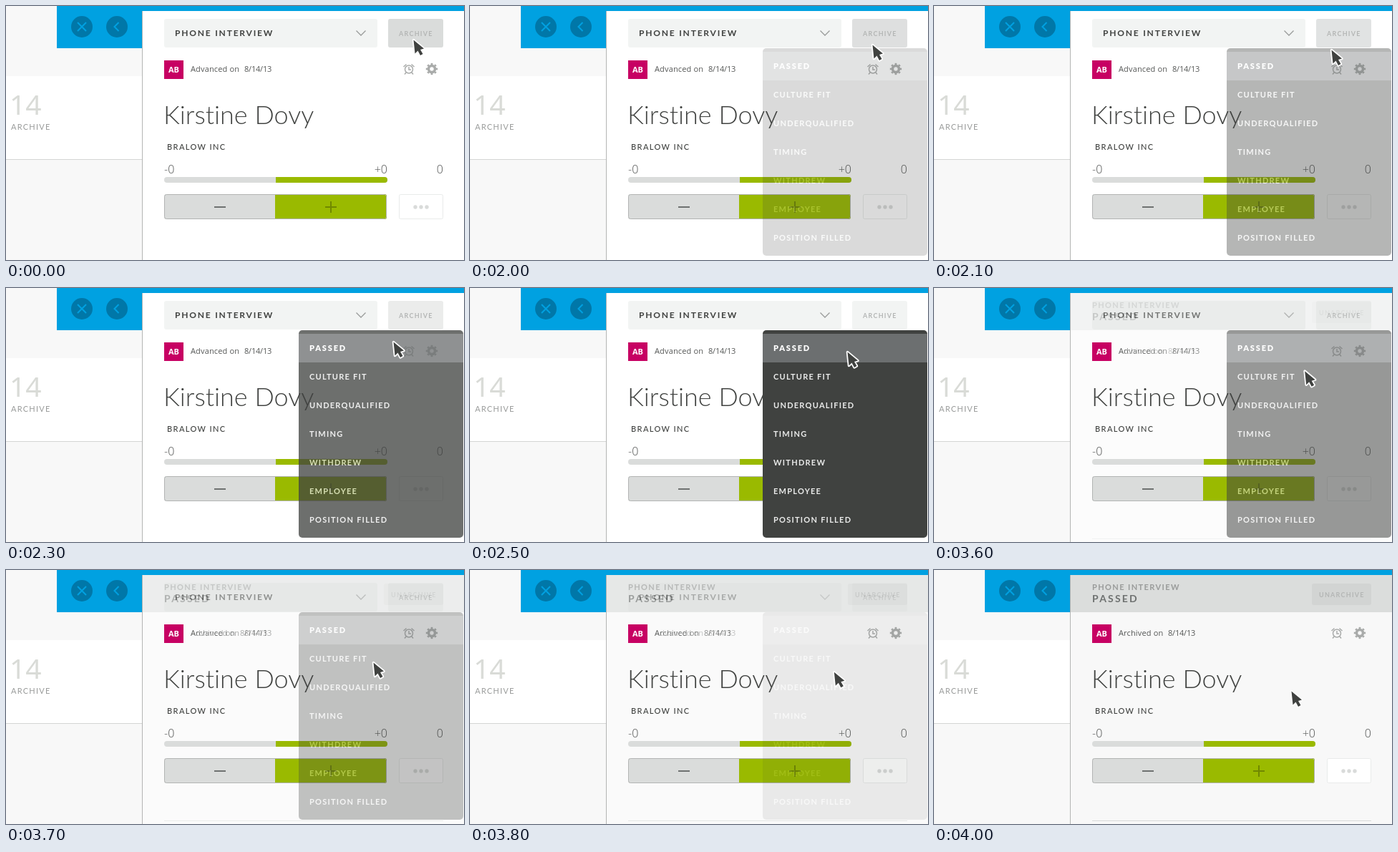
An HTML page that plays this animation: 640x355 px, repeating every 7 s.

```html
<!DOCTYPE html>
<html lang="en">
<head>
<meta charset="utf-8">
<title>Archive a candidate</title>
<style>
  html, body { margin: 0; width: 100%; height: 100%; overflow: hidden; background: #f8f8f8; }
  svg { display: block; width: 640px; height: 355px; }
  text { font: 11px "Open Sans", sans-serif; fill: #555756; white-space: pre; }
  .caps { font: 700 11px Lato, sans-serif; letter-spacing: 1.25px; fill: #404240; }
  .button { font-size: 9px; fill: #b4b6b5; }
  .score { font-size: 16px; font-weight: 300; }
  .name { font: 300 36px Lato, sans-serif; font-variant-ligatures: none; fill: #404240; }
  .line { fill: none; stroke-width: 2; }
  #menu .caps { fill: #eaebea; }
  #menu .active { font-weight: 900; letter-spacing: 1.8px; fill: #fff; }
</style>
</head>
<body>
<svg viewBox="0 0 640 355">
  <!-- page behind the panel -->
  <rect width="640" height="355" fill="#f8f8f8"/>
  <rect y="98" width="191" height="116" fill="#fff"/>
  <rect y="214" width="191" height="1" fill="#d4d5d4"/>
  <text x="5" y="152" style="font:39px 'Noto Sans',sans-serif;fill:#d9dbd7">14</text>
  <text class="caps" x="7" y="173" style="font-weight:400;fill:#999b9a">ARCHIVE</text>
  <path d="M71 0H640V7H191V59H71Z" fill="#00a1e1"/>
  <g fill="#0077a8"><circle cx="106" cy="29" r="15"/><circle cx="155" cy="29" r="15"/></g>
  <path class="line" d="M100 23l12 12m0-12l-12 12M157.500 23l-6 6 6 6" stroke="#00a1e1"/>

  <!-- panel; the archived state fades in over the active one -->
  <rect x="190" y="7" width="1" height="348" fill="#b4b5b4"/>
  <rect x="191" y="7" width="449" height="348" fill="#fff"/>
  <rect x="221" y="18" width="298" height="40" rx="3" fill="#f2f4f3"/>
  <text class="caps" x="236" y="42" style="font-size:12px;letter-spacing:1.8px">PHONE INTERVIEW</text>
  <path class="line" d="M489.500 34.500l6.500 6.500 6.500-6.500" stroke="#999b9a" style="stroke-width:1.300"/>
  <rect x="534" y="18" width="77" height="40" rx="3" fill="#f2f4f3"/>
  <rect id="hover" x="534" y="18" width="77" height="40" rx="3" fill="#dadcdb"/>
  <text class="caps button" x="549" y="42">ARCHIVE</text>
  <text x="258" y="92" letter-spacing=".15">Advanced on</text>
  <text x="333" y="92" letter-spacing="-.2">8/14/13</text>
  <g id="archived">
    <rect x="191" y="7" width="449" height="348" fill="#f8f8f8"/>
    <rect x="191" y="7" width="449" height="52" fill="#dbdddc"/>
    <rect x="221" y="350" width="390" height="1" fill="#d8dad9"/>
    <text class="caps" x="221" y="28" style="letter-spacing:1.4px;fill:#999b9a">PHONE INTERVIEW</text>
    <text class="caps" x="221" y="45" style="font-size:14px;letter-spacing:2.2px;fill:#6e7170">PASSED</text>
    <rect x="528" y="19" width="83" height="30" rx="3" fill="#d2d4d3"/>
    <text class="caps button" x="538" y="38">UNARCHIVE</text>
    <text x="258" y="92" letter-spacing=".15">Archived on</text>
    <text x="327" y="92" letter-spacing="-.2">8/14/13</text>
  </g>

  <rect x="221" y="76" width="27" height="26" fill="#c70063"/>
  <text x="227" y="93" style="font-weight:700;fill:#fff">AB</text>
  <g class="line" stroke="#a9abaa" style="stroke-width:1.500">
    <circle cx="563" cy="88.500" r="5.500"/>
    <path d="M563 85v4h3M559 93l-2 2.500M567 93l2 2.500M555.500 85l4-3.500M570.500 85l-4-3.500"/>
  </g>
  <g class="line" stroke="#a9abaa">
    <circle cx="595" cy="88" r="4.500" style="stroke-width:3.600"/>
    <circle cx="595" cy="88" r="7" pathLength="16" stroke-dasharray="1" stroke-dashoffset=".5" style="stroke-width:2.400"/>
  </g>
  <text class="name" x="220" y="165">Kirstine Dovy</text>
  <text class="caps" x="225" y="201" style="font-weight:500;letter-spacing:1.4px">BRALOW INC</text>

  <!-- score -->
  <text class="score" x="221" y="234">-0</text>
  <text class="score" x="533" y="234" text-anchor="end">+0</text>
  <text class="score" x="611" y="234" text-anchor="end">0</text>
  <rect x="221" y="239" width="312" height="8" rx="4" fill="#dadcdb"/>
  <path d="M377 239H529a4 4 0 0 1 0 8H377Z" fill="#9aba00"/>
  <rect x="221" y="263" width="311" height="35" rx="3" fill="#dadcdb"/>
  <path d="M376 263H529a3 3 0 0 1 3 3v29a3 3 0 0 1-3 3H376Z" fill="#9aba00"/>
  <rect x="221.500" y="263.500" width="310" height="34" rx="3" fill="none" stroke="#b2b4b3"/>
  <path class="line" d="M291 281h16" stroke="#6e7170"/>
  <path class="line" d="M446 281h16M454 273v16" stroke="#708800"/>
  <rect x="549.500" y="263.500" width="61" height="34" rx="2" fill="#fff" stroke="#e9ebea"/>
  <g fill="#d9dbda">
    <circle cx="572" cy="281" r="2.700"/><circle cx="580" cy="281" r="2.700"/><circle cx="588" cy="281" r="2.700"/>
  </g>

  <g id="menu">
    <rect x="409" y="59" width="230" height="290" rx="5" fill="#404240"/>
    <rect x="409" y="64" width="230" height="40" fill="#6c6f70"/>
  </g>
  <path id="cursor" d="M0 0L2 19 6 15 9.500 21.500 13 19.500 9.500 13.500 14.500 12Z"
    fill="#404240" stroke="#fff" stroke-width="3.500" paint-order="stroke" stroke-linejoin="round"/>
</svg>
<script>
  const LOOP = 7000, OPEN = 2000, CLOSE = 3500, STEP = 100, STEPS = 6;
  const [menu, cursor, hover, archived] =
    ['menu', 'cursor', 'hover', 'archived'].map(id => document.getElementById(id));
  const clamp = (v, lo, hi) => Math.min(hi, Math.max(lo, v));

  ['PASSED', 'CULTURE FIT', 'UNDERQUALIFIED', 'TIMING', 'WITHDREW', 'EMPLOYEE', 'POSITION FILLED']
    .forEach((label, i) => {
      const text = document.createElementNS(menu.namespaceURI, 'text');
      text.setAttribute('class', i ? 'caps' : 'caps active');
      text.setAttribute('x', 424);
      text.setAttribute('y', 88 + 40 * i);
      text.textContent = label;
      menu.append(text);
    });

  // Both transitions advance in whole steps.
  const stepsSince = (t, start) => clamp(Math.floor((t - start) / STEP) + 1, 0, STEPS);

  function draw() {
    const t = performance.now() % LOOP;
    const opening = stepsSince(t, OPEN), closing = stepsSince(t, CLOSE);
    const opened = opening / STEPS, closed = closing / STEPS;

    menu.style.opacity = closing
      ? clamp(0.985 - 0.225 * closing, 0, 1)
      : clamp(0.19 * opening, 0, 1);
    hover.style.opacity = 1 - opened;
    archived.style.opacity = closed;

    const x = 569.5 - 42 * opened - 28 * closed;
    const y = 47.5 + 42 * opened + 80 * closed;
    cursor.setAttribute('transform', `translate(${x} ${y})`);
    requestAnimationFrame(draw);
  }
  draw();
</script>
</body>
</html>
```
